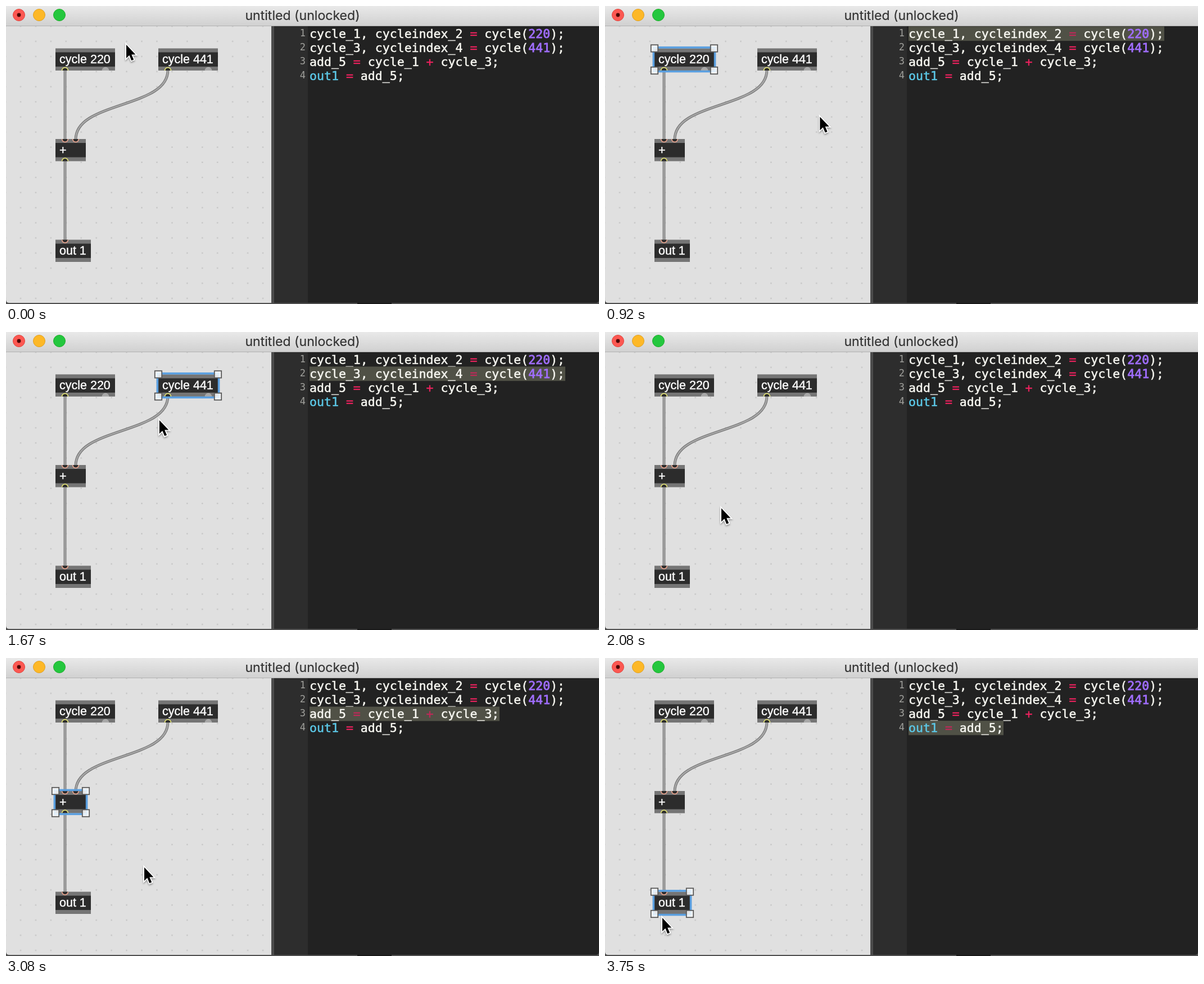
These frames come from a looping animation (1055x531 px, 3830 ms). An HTML page:

```html
<!DOCTYPE html>
<html lang="en">
<head>
<meta charset="utf-8">
<title>Patcher and code</title>
<style>
  html, body { margin: 0; width: 100%; height: 100%; overflow: hidden; background: #222; }
  svg { display: block; width: 100vw; height: 100vh; }
  text { white-space: pre; }
  .title { font: 23.1px Inter, sans-serif; fill: #333; stroke: #333; stroke-width: .2; text-anchor: middle; }
  .label { font: 21.5px "Liberation Sans", Arial, sans-serif; fill: #fff; stroke: #fff; stroke-width: .4; }
  .code { font: 21.55px "DejaVu Sans Mono", monospace; fill: #f8f8f2; stroke: #f8f8f2; stroke-width: .5; }
  .num { font: 17px "DejaVu Sans Mono", monospace; fill: #a0a09c; text-anchor: end; }
  .op { fill: #f0225f; stroke: #f0225f; }
  .on .op { fill: #c2285a; stroke: #c2285a; }
  .val { fill: #a16eff; stroke: #a16eff; stroke-width: .8; }
  .out { fill: #5cc9e8; stroke: #5cc9e8; }
  .mark { fill: #505146; visibility: hidden; }
  .on .mark { visibility: visible; }
  .cord path { fill: none; stroke: #707070; stroke-width: 4.8; }
  .cord path + path { stroke: #a6a6a6; stroke-width: 2.8; }
  .frame { fill: none; stroke: #5a9fe0; stroke-width: 3.6; }
  .knob { fill: #fff; fill-opacity: .82; stroke: #585858; stroke-width: 1.8; }
  #lasso { fill: rgba(204, 204, 204, .46); stroke: rgba(245, 245, 245, .8); stroke-width: 1.5; }
  #cursor { filter: drop-shadow(0 2px 1.5px rgba(0, 0, 0, .35)); }
</style>
</head>
<body>
<svg viewBox="0 0 1055 531" preserveAspectRatio="none">
  <defs>
    <linearGradient id="bar" x2="0" y2="1">
      <stop stop-color="#e9e9e9"/><stop offset="1" stop-color="#d0d0d0"/>
    </linearGradient>
    <pattern id="dots" x="12.5" y="49.5" width="26.94" height="26.94" patternUnits="userSpaceOnUse">
      <rect x="12.5" y="12.5" width="2" height="2" fill="#b9b9b9"/>
    </pattern>
  </defs>

  <rect width="1055" height="531" fill="#505050"/>
  <rect x="625" y="529" width="61" height="2" fill="#191919"/>
  <path d="M0 36H472V529H6Q0 529 0 523Z" fill="#e0e0e0"/>
  <path d="M0 36H472V529H6Q0 529 0 523Z" fill="url(#dots)"/>
  <rect x="472" y="36" width="5" height="493" fill="#4c4c4c"/>
  <rect x="477" y="36" width="60" height="493" fill="#2d2d2d"/>
  <path d="M537 36H1055V523Q1055 529 1049 529H537Z" fill="#222"/>

  <rect width="1055" height="36" fill="url(#bar)"/>
  <rect y="35" width="1055" height="1" fill="#b2b2b2"/>
  <g stroke-width="1">
    <circle cx="23" cy="16" r="10.5" fill="#fc5852" stroke="#e0443e"/>
    <circle cx="23" cy="16" r="3.4" fill="#4d0705"/>
    <circle cx="59" cy="16" r="10.5" fill="#fdb827" stroke="#e0a022"/>
    <circle cx="95" cy="16" r="10.5" fill="#24c73e" stroke="#1dad2b"/>
  </g>
  <text class="title" x="527.5" y="25">untitled (unlocked)</text>

  <g id="code"></g>
  <g id="patch"></g>
  <g id="pick"></g>
  <rect id="lasso"/>
  <path id="cursor" d="M1 2V26L6.4 20.8L10.3 30.2L14.2 28.6L10.3 19.4H17.4Z"
        fill="#000" stroke="#fff" stroke-width="3.6" paint-order="stroke"/>
</svg>

<script>
const el = id => document.getElementById(id);

// Code pane
const op = s => `<tspan class="op">${s}</tspan>`;
const val = s => `<tspan class="val">${s}</tspan>`;
const lines = [
  [35, `cycle_1, cycleindex_2 ${op('=')} cycle(${val(220)});`],
  [35, `cycle_3, cycleindex_4 ${op('=')} cycle(${val(441)});`],
  [26, `add_5 ${op('=')} cycle_1 ${op('+')} cycle_3;`],
  [13, `<tspan class="out">out1</tspan> ${op('=')} add_5;`]
];
el('code').innerHTML = lines.map(([len, body], i) => {
  const y = 36.5 + i * 25.1;
  return `<g><rect class="mark" x="540" y="${y}" width="${len * 13}" height="25.6"/>
    <text class="num" x="533" y="${y + 17.5}">${i + 1}</text>
    <text class="code" x="540" y="${y + 20}">${body}</text></g>`;
}).join('');
const rows = [...el('code').children];

// Patcher pane
const boxes = [
  { x: 88, y: 75.5, w: 106, label: 'cycle 220', outs: [105], idle: 177 },
  { x: 271, y: 75.5, w: 106, label: 'cycle 441', outs: [288], idle: 360 },
  { x: 88, y: 237, w: 54, label: '+', ins: [105, 124], outs: [105] },
  { x: 88, y: 416.5, w: 63, label: 'out 1', ins: [105] }
];
const H = 39.5;
const arc = (x, y, sweep, fill, stroke) =>
  `<path d="M${x - 5.4} ${y}A5.4 5.4 0 0 ${sweep} ${x + 5.4} ${y}" fill="${fill}" stroke="${stroke}" stroke-width="1.7"/>`;
const drawBox = ({ x, y, w, label, ins = [], outs = [], idle }) => `
  <rect x="${x}" y="${y}" width="${w}" height="${H}" fill="#757575"/>
  <rect x="${x}" y="${y + 7}" width="${w}" height="25.5" fill="#2c2c2c"/>
  <text class="label" x="${x + 7}" y="${y + 26.5}">${label}</text>
  ${ins.map(p => arc(p, y, 0, '#2c2c2c', '#eaa48e')).join('')}
  ${outs.map(p => arc(p, y + H, 1, '#2c2c2c', '#e0e074')).join('')}
  ${idle ? arc(idle, y + H, 1, '#a8a8a8', '#a8a8a8') : ''}`;
const drawCord = d => `<g class="cord"><path d="${d}"/><path d="${d}"/></g>`;
const cords = ['M105 114V238', 'M288 114C288 148 250 161 206 176S124 204 124 238', 'M105 275V418'];
el('patch').innerHTML = cords.map(drawCord).join('') + boxes.map(drawBox).join('');

el('pick').innerHTML = boxes.map(({ x, y, w }) => {
  const knobs = [[x, y], [x + w, y], [x, y + H], [x + w, y + H]]
    .map(([a, b]) => `<rect class="knob" x="${a - 6.2}" y="${b - 6.2}" width="12.4" height="12.4"/>`);
  return `<g><rect class="frame" x="${x - 1.6}" y="${y - 1.6}" width="${w + 3.2}" height="${H + 3.2}"/>${knobs.join('')}</g>`;
}).join('');
const picks = [...el('pick').children];

// Timeline, counted in ticks of 1/12 s
const LOOP = 3830;
const path = [
  [0, 213, 67], [5, 135, 104], [7, 135, 104], [12, 410, 206], [15, 320, 60],
  [17, 314, 54], [24, 207, 311], [25, 206, 312], [30, 61, 206], [32, 60, 206],
  [35, 243, 366], [37, 245, 371], [38, 246, 372], [42, 103, 459], [45, 101, 461]
];
const selection = [[0, -1], [4, 0], [12, -1], [14, 1], [24, -1], [28, 2], [38, -1], [41, 3]];
const drags = [
  { from: 13, to: 17, x: 410, y: 207 },
  { from: 26, to: 31, x: 210, y: 315 },
  { from: 39, to: 43, x: 247, y: 374 }
];

function pointer(k) {
  const i = Math.max(1, path.findIndex(p => p[0] >= k));
  const [k0, x0, y0] = path[i - 1], [k1, x1, y1] = path[i];
  const u = (k - k0) / (k1 - k0), e = u * u * (3 - 2 * u);
  return [x0 + (x1 - x0) * e, y0 + (y1 - y0) * e];
}

function draw(k) {
  const [x, y] = pointer(k);
  el('cursor').setAttribute('transform', `translate(${x} ${y})`);

  const sel = selection.filter(s => s[0] <= k).pop()[1];
  rows.forEach((r, i) => r.classList.toggle('on', i === sel));
  picks.forEach((p, i) => p.style.display = i === sel ? '' : 'none');

  const drag = drags.find(d => k >= d.from && k <= d.to);
  const lasso = el('lasso');
  lasso.style.display = drag ? '' : 'none';
  if (!drag) return;
  // The lasso corner trails the pointer slightly
  const [px, py] = pointer(k - 1);
  const cx = x + .14 * (px - x), cy = y + 2 + .14 * (py - y);
  const set = (name, v) => lasso.setAttribute(name, v);
  set('x', Math.min(cx, drag.x));
  set('y', Math.min(cy, drag.y));
  set('width', Math.abs(cx - drag.x));
  set('height', Math.abs(cy - drag.y));
}

const start = performance.now();
function tick() {
  const t = (performance.now() - start) % LOOP;
  draw(Math.min(45, Math.ceil(3 * (Math.floor(t / 10) + 1) / 25) - 1));
  requestAnimationFrame(tick);
}
tick();
</script>
</body>
</html>
```
